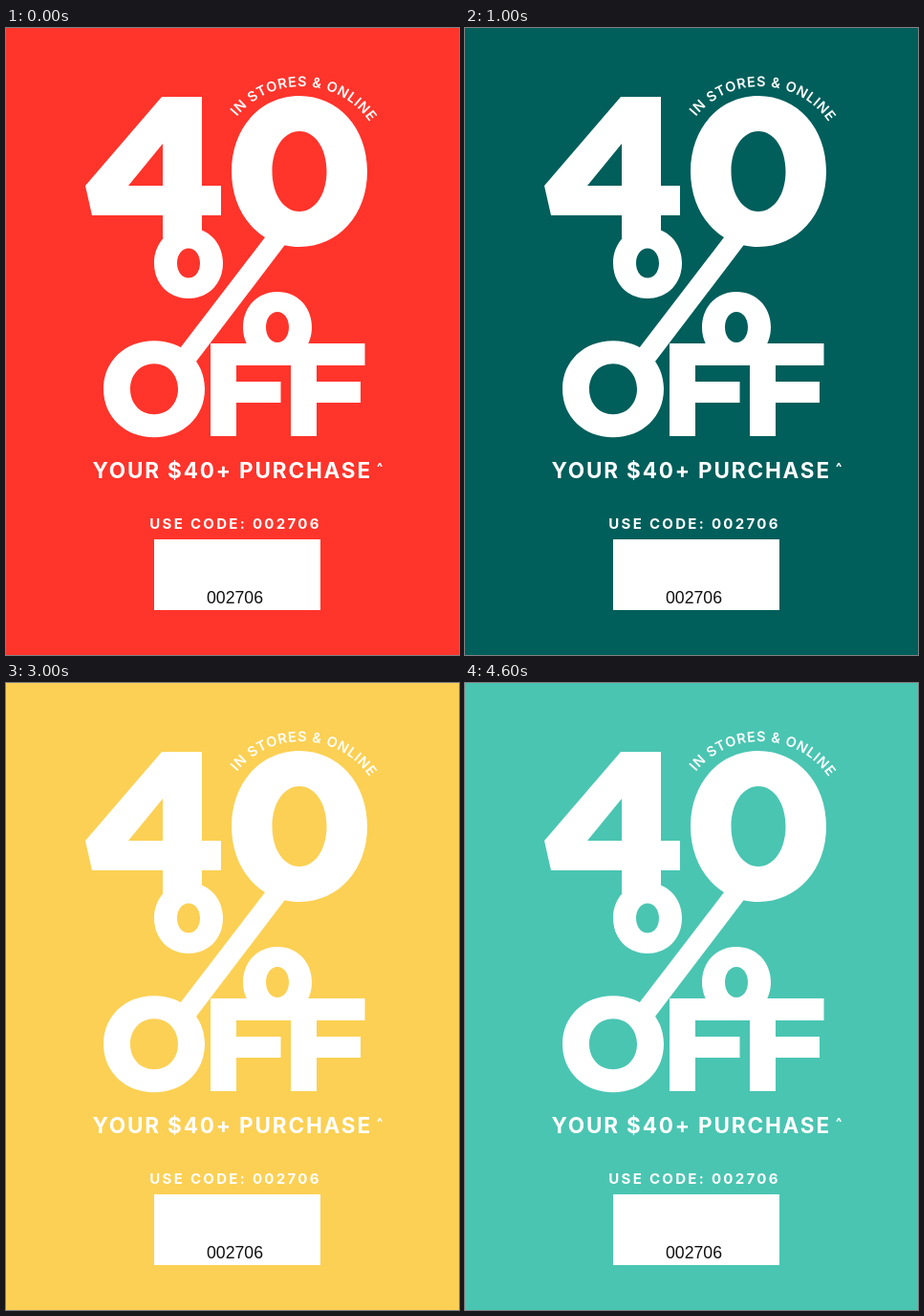
An HTML page for the animation above (5000 ms loop, 474 by 656 pixels).

```html
<!DOCTYPE html>
<html lang="en">
<head>
<meta charset="utf-8">
<title>40% off</title>
<style>
  html, body { margin: 0; width: 100%; height: 100%; overflow: hidden; }
  svg { display: block; width: 100%; height: 100%; background: #ff342b; }
  text { fill: #fff; font-family: Inter, sans-serif; font-weight: 700; text-anchor: middle; }
  .arc { font-size: 14.5px; font-weight: 600; letter-spacing: .8px; }
  .offer { font-size: 22.5px; letter-spacing: 1.85px; }
  .mark { font-size: 12.5px; font-weight: 900; }
  .code { font-size: 15px; letter-spacing: 2.3px; }
  .number { fill: #111; font: 17.7px "Liberation Sans", Arial, sans-serif; }
</style>
</head>
<body>
<svg id="card" viewBox="0 0 474 656">
  <defs><path id="curve" d="M221.5 148.5A87.5 87.5 0 0 1 396.5 148.5"/></defs>
  <g id="art" fill="#fff" fill-rule="evenodd">
    <!-- digit 4 -->
    <path d="M163 72H205V165H225V196H205V220H164V196H90L83 165ZM164 121V165H128Z"/>
    <!-- percent slash -->
    <path d="M275 213.8L298 218.8L194 355.6L179 339Z"/>
    <!-- FF -->
    <path d="M214 330H375.5V353H325V370H371V392H325V427H298V353H241V370H287.5V392H241V427H214Z"/>
    <rect x="155" y="535" width="174" height="74"/>
  </g>
  <text class="arc"><textPath href="#curve" startOffset="51.4%">IN STORES &amp; ONLINE</textPath></text>
  <text class="offer" x="236.7" y="471">YOUR $40+ PURCHASE</text>
  <text class="mark" x="391" y="464">^</text>
  <text class="code" x="240" y="523.5">USE CODE: 002706</text>
  <text class="number" x="239.5" y="602">002706</text>
</svg>
<script>
  const card = document.getElementById('card');
  const art = document.getElementById('art');
  const colors = ['#ff342b', '#005e5b', '#f86604', '#fbd054', '#4ac5b2'];
  const HOLD = 1000;
  const ROUND = 0.575; // slightly fuller than a true ellipse

  function oval(x, y, rx, ry) {
    const kx = rx * ROUND, ky = ry * ROUND;
    return `M${x - rx} ${y}C${x - rx} ${y - ky} ${x - kx} ${y - ry} ${x} ${y - ry}` +
      `S${x + rx} ${y - ky} ${x + rx} ${y}S${x + kx} ${y + ry} ${x} ${y + ry}` +
      `S${x - rx} ${y + ky} ${x - rx} ${y}Z`;
  }

  function ring(x, y, rx, ry, holeX, holeY) {
    const path = document.createElementNS('http://www.w3.org/2000/svg', 'path');
    path.setAttribute('d', oval(x, y, rx, ry) + oval(x, y, holeX, holeY));
    art.append(path);
  }

  ring(307, 150, 71, 79, 28.5, 42);
  ring(191, 246, 36, 37, 12, 15.5);
  ring(284, 313, 36, 37, 12, 16);
  ring(155, 377.7, 53, 50.5, 25, 26.5);

  function draw() {
    const step = Math.floor(performance.now() / HOLD);
    card.style.background = colors[step % colors.length];
    requestAnimationFrame(draw);
  }
  draw();
</script>
</body>
</html>
```
